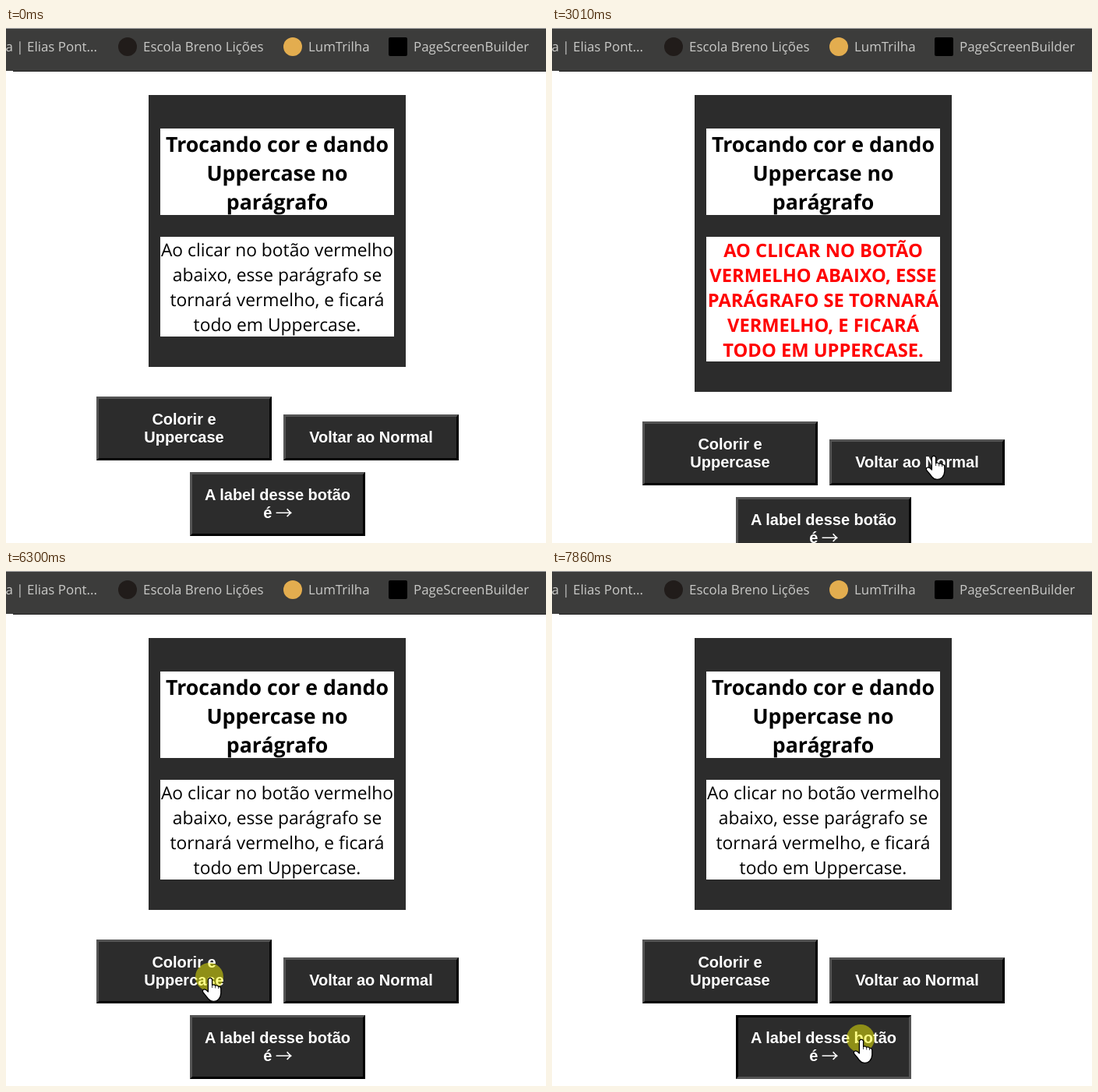
An HTML page that plays this animation: 693 px wide and 661 px high, repeating every 7.99 s.

```html
<!DOCTYPE html>
<html lang="pt-BR">
<head>
<meta charset="utf-8">
<title>Trocando cor</title>
<style>
html, body { margin: 0; width: 100%; height: 100%; overflow: hidden; background: #fff; }
#stage { position: relative; width: 693px; height: 661px; overflow: hidden; text-rendering: geometricPrecision; }
#stage * { box-sizing: border-box; }
.bar, .bar *, .card, .card *, button, #cursor { position: absolute; margin: 0; white-space: nowrap; }

.bar { left: 0; top: 0; width: 693px; height: 56px; background: #3c3c3b; border-top: 1px solid #a8a8a8; border-bottom: 1px solid #222; }
.bar span { top: 11px; font: 16.9px/24px "Open Sans", "Noto Sans", sans-serif; color: #c9c9c7; }
.bar i { top: 11px; width: 24px; height: 24px; border-radius: 50%; }
.bar b { left: 0; top: 54px; width: 9px; height: 1px; background: #fff; }

.card { left: 183px; top: 86px; width: 330px; height: 349px; background: #2c2c2c; font-family: "Open Sans", "Noto Sans", sans-serif; text-align: center; }
.card > * { left: 15px; width: 300px; padding-top: 1px; background: #fff; color: #000; }
h1 { top: 43px; height: 111px; font-size: 26.7px; line-height: 37px; font-weight: 700; }
p { top: 182px; height: 128px; font-size: 22.8px; line-height: 32px; }
p.loud { display: none; height: 160px; font-size: 23.7px; font-weight: 700; color: #f00; text-transform: uppercase; }

button { width: 225px; height: 82px; padding: 0; border: 3px solid; border-color: #545454 #000 #000 #545454; border-radius: 0; background: #2c2c2c; color: #fff; font: bold 20px/23px "Liberation Sans", Arial, sans-serif; }
button.down { border-color: #000 #545454 #545454 #000; }
button span { position: relative; top: 1px; margin: 0 -1px; font: 22px/1px "Noto Sans CJK JP", "Noto Sans CJK SC", "Noto Sans CJK", sans-serif; }
#paint { left: 116px; top: 473px; }
#reset { left: 356px; top: 496px; height: 59px; }
#label { left: 236px; top: 570px; }

.upper .card { height: 381px; }
.upper p.calm { display: none; }
.upper p.loud { display: block; }
.upper button { transform: translateY(32px); }

#cursor { left: 0; top: 0; width: 1px; height: 1px; overflow: visible; }
#cursor path { fill: #fff; stroke: #000; stroke-width: 1.3; stroke-linejoin: round; }
#cursor .crease { fill: none; stroke-width: .8; }
</style>
</head>
<body>
<div id="stage">
  <div class="bar">
    <span style="right:576px">ra | Elias Pont...</span>
    <i style="left:144px;background:#211c1a"></i><span style="left:176px">Escola Breno Lições</span>
    <i style="left:356px;background:#e3ad4f"></i><span style="left:388px">LumTrilha</span>
    <i style="left:491px;background:#000;border-radius:2px"></i><span style="left:523px">PageScreenBuilder</span>
    <b></b>
  </div>

  <div class="card">
    <h1>Trocando cor e dando<br>Uppercase no<br>parágrafo</h1>
    <p class="calm">Ao clicar no botão vermelho<br>abaixo, esse parágrafo se<br>tornará vermelho, e ficará<br>todo em Uppercase.</p>
    <p class="loud">Ao clicar no botão<br>vermelho abaixo, esse<br>parágrafo se tornará<br>vermelho, e ficará<br>todo em Uppercase.</p>
  </div>

  <button id="paint">Colorir e<br>Uppercase</button>
  <button id="reset">Voltar ao Normal</button>
  <button id="label">A label desse botão<br>é <span>→</span></button>

  <svg id="cursor">
    <circle id="glow" r="18" fill="#ff0" fill-opacity=".47"/>
    <g id="hand" transform="translate(1 1)">
      <path d="M-2.6 2Q0-1.5 2.6 2V9.5Q5 8 6.7 10.3Q9 9 10.6 11.3Q13.8 11 13.8 14.5V20Q13.6 25 10.6 28Q8 30.6 4 30.4Q0 30.2-2.5 27Q-5 23.5-9 19Q-10.6 16-8 15Q-5.6 14.6-2.6 18Z"/>
      <path class="crease" d="M2.6 9.5V13M6.7 10.5V13.5M10.6 11.5V14"/>
    </g>
    <path id="arrow" d="M0 0V24L5.5 19L9 27L12.5 25.5L9 18H16.5Z"/>
  </svg>
</div>
<script>
const LOOP = 7990;
const $ = id => document.getElementById(id);
const stage = $('stage'), cursor = $('cursor');

const inOut = u => u < .5 ? .5 * (2 * u) ** 2.2 : 1 - .5 * (2 - 2 * u) ** 2.2;
const easeIn = u => u ** 1.3;
const easeOut = u => 1 - (1 - u) ** 1.5;

// start ms, steps, ms per step, target x, target y, easing
const moves = [
  [500, 8, 68.5, 244, 514, easeOut],
  [2380, 10, 70, 489, 548, inOut],
  [5540, 1, 68, 458, 553, easeOut],
  [5608, 6, 68.3, 261, 521, easeOut],
  [6435, 3, 67.5, 328, 539, easeIn],
  [6637, 4, 67.5, 428, 552, easeOut],
  [7317, 8, 67.5, 396, 600, inOut]
];

// start ms, end ms, button shown pressed
const clicks = [
  [1380, 1440],
  [4270, 4340, 'reset'],
  [6300, 6365],
  [7040, 7105, 'reset'],
  [7860, LOOP, 'label']
];
const uppers = [[1440, 4340], [6365, 7105]];

// left, top, right, bottom
const zones = [[116, 473, 341, 555], [356, 496, 581, 555], [236, 570, 461, 652]];

const within = (t, [from, to]) => t >= from && t < to;
const show = (el, on) => el.style.display = on ? '' : 'none';

function pointer(t) {
  let x = 280, y = 690;
  for (const [start, steps, ms, tx, ty, ease] of moves) {
    if (t < start) break;
    const u = ease(Math.min(1, (Math.floor((t - start) / ms) + 1) / steps));
    x += (tx - x) * u;
    y += (ty - y) * u;
  }
  return [Math.round(x), Math.round(y)];
}

function draw(t) {
  const upper = uppers.some(span => within(t, span));
  const click = clicks.find(span => within(t, span));
  const [x, y] = pointer(t);
  const py = upper ? y - 32 : y;
  const over = zones.some(([l, top, r, b]) => x >= l && x < r && py >= top && py < b);

  stage.classList.toggle('upper', upper);
  for (const id of ['reset', 'label']) $(id).classList.toggle('down', !!click && click[2] === id);
  show(cursor, t >= 500);
  show($('glow'), click);
  show($('hand'), over);
  show($('arrow'), !over);
  cursor.style.transform = `translate(${x}px, ${y}px)`;
}

const begin = performance.now();
function tick() {
  draw((performance.now() - begin) % LOOP);
  requestAnimationFrame(tick);
}
tick();
</script>
</body>
</html>
```
